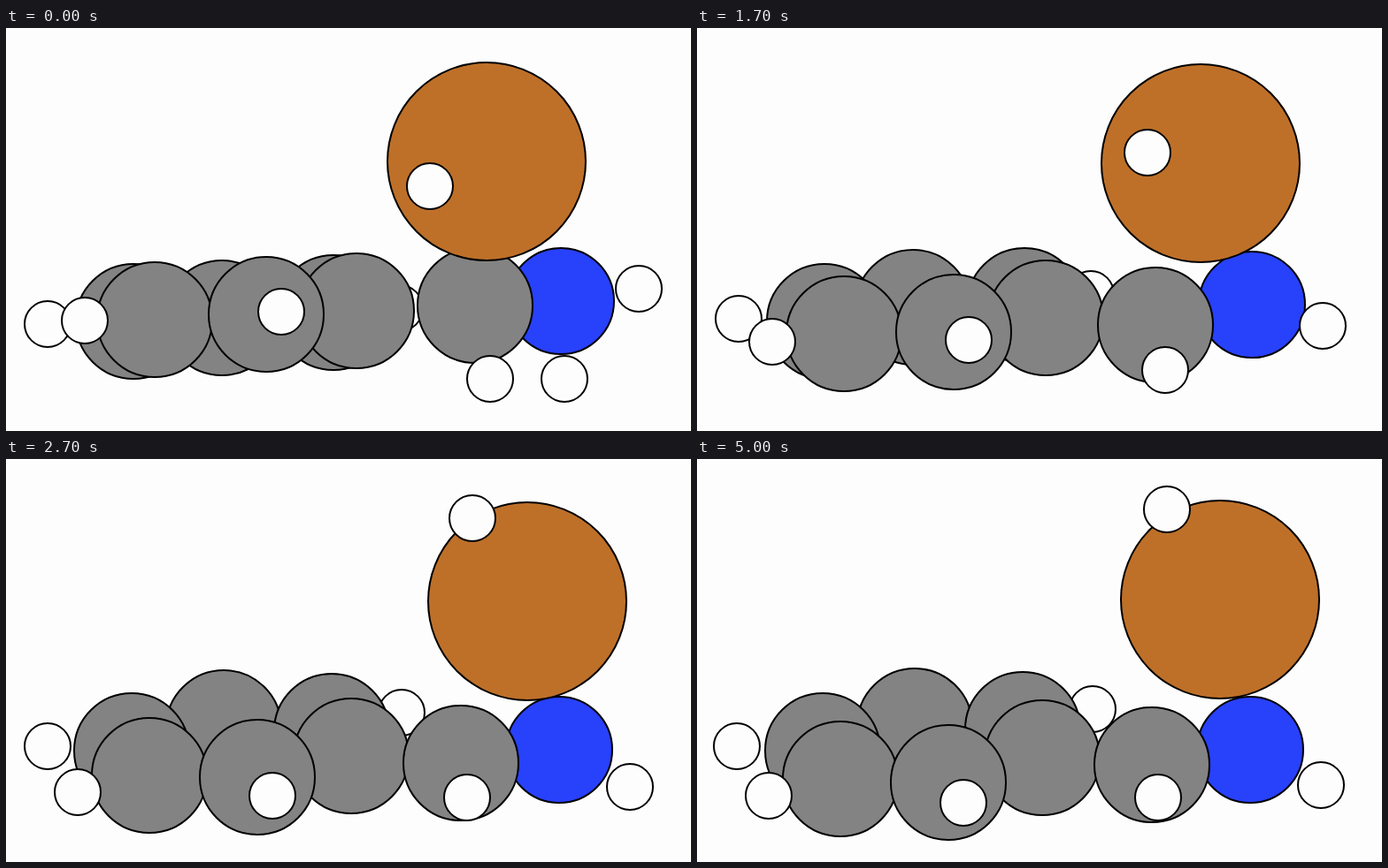
Write an HTML page that moves like this. It is 774 px wide and 456 px high and loops after 5100 ms.

```html
<!DOCTYPE html>
<html lang="en">
<head>
<meta charset="utf-8">
<title>Molecule</title>
<style>
  html, body { margin: 0; width: 100%; height: 100%; overflow: hidden; background: #fdfdfd; }
  svg { display: block; width: 774px; height: 456px; }
  circle { stroke: #000; stroke-width: 2; }
</style>
</head>
<body>
<svg id="stage" viewBox="0 0 774 456"></svg>
<script>
const STEP = 100, STEPS = 51;
const KINDS = {
  H: { r: 26, fill: '#fdfdfd' },
  C: { r: 65, fill: '#838383' },
  N: { r: 60, fill: '#2841fb' },
  X: { r: 112, fill: '#be7029' }
};
const stage = document.getElementById('stage');
const atoms = [];

function ease(n, begin, end) {
  const u = Math.min(1, Math.max(0, (n - begin) / (end - begin)));
  return u * u * (3 - 2 * u);
}

// One eased move between two steps, then an optional small settling shift.
const move = (from, to = from, begin = 2, end = 33, settle = 0) =>
  n => from + (to - from) * ease(n, begin, end) + settle * ease(n, 34, 45);

function atom(kind, x, y) {
  const { r, fill } = KINDS[kind];
  const el = document.createElementNS('http://www.w3.org/2000/svg', 'circle');
  el.setAttribute('r', r);
  el.setAttribute('fill', fill);
  stage.appendChild(el);
  atoms.push({ el, x, y, odd: (r + 1) % 2 });
}

// Circle edges sit on a 2px grid.
const snap = (v, odd) => 2 * Math.round((v - odd) / 2) + odd;

// Back to front
atom('H', move(47, 45, 27, 34), move(335, 325, 0, 27));
atom('H', move(445, 447), move(317, 283));
atom('H', move(631), move(397, 325, 0, 27));
atom('N', move(627, 625), move(309, 331, 11, 31, -2));
atom('C', move(244, 246), move(328, 302));
atom('C', move(370, 368), move(322, 306));
atom('C', move(144, 142), move(332, 330));
atom('C', move(396, 390), move(320, 338));
atom('C', move(168, 162), move(330, 362));
atom('C', move(294, 284), move(324, 364, 2, 33, 2));
atom('C', move(532, 514, -6, 27), move(311, 344, -6, 27, 2));
atom('X', move(543, 591, 2, 31), move(151, 161, 11, 28, -2));
atom('H', move(89, 81), move(331, 381));
atom('H', move(311, 301), move(321, 387, 2, 33, 2));
atom('H', move(479, 529, 0, 30, 2), move(179, 61, 9, 30, -4));
atom('H', move(715, 705, -4, 27), move(295, 371, 4, 28, -2));
atom('H', move(549, 521, -6, 30), move(398, 383, -6, 27));

const start = performance.now();

function draw() {
  const n = Math.floor(Math.max(0, performance.now() - start) / STEP) % STEPS;
  for (const { el, x, y, odd } of atoms) {
    el.setAttribute('cx', snap(x(n), odd));
    el.setAttribute('cy', snap(y(n), odd));
  }
  requestAnimationFrame(draw);
}
draw();
</script>
</body>
</html>
```
